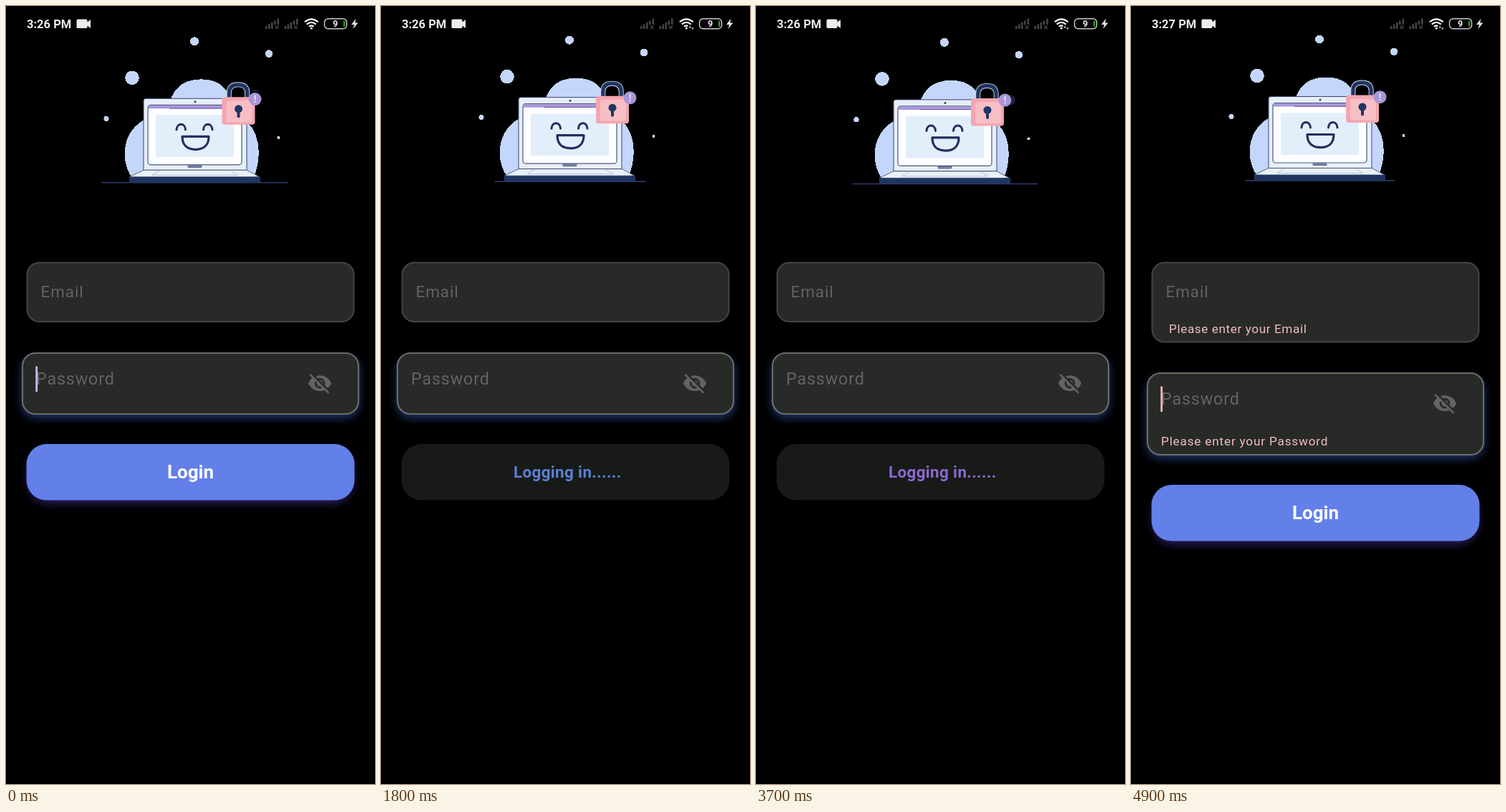
These frames come from a looping animation (515 px wide and 1087 px high, 5000 ms). An HTML page:

```html
<!DOCTYPE html>
<html lang="en">
<head>
<meta charset="utf-8">
<title>Login</title>
<style>
  html, body { margin: 0; width: 100%; height: 100%; overflow: hidden; background: #000; }
  svg { display: block; width: 100%; height: 100%; }
  text { font-family: Roboto, sans-serif; }
  .hint { fill: #626461; }
  .error { fill: #efbdc2; font-size: 17.2px; }
  .box { fill: #282a27; }
  .navy { stroke: #22305e; fill: none; stroke-linecap: round; }
</style>
</head>
<body>
<svg viewBox="0 0 515 1087">
  <defs>
    <filter id="blur" x="-20%" y="-50%" width="140%" height="200%"><feGaussianBlur stdDeviation="6.500"/></filter>
    <g id="signal" fill="#454545">
      <path d="M0 28h2.600v4H0zM4 25.500h2.600V32H4zM8 23h2.600v9H8zM12 20.500h2.600v5.500H12zM16.500 17.500h2.600v8.500h-2.600z"/>
      <path d="M13.500 27.500l5 4.500m0-4.500l-5 4.500" stroke="#454545" stroke-width="1.300"/>
    </g>
  </defs>
  <rect width="515" height="1087"/>

  <g id="status" fill="#ececec">
    <text id="clock" x="29" y="31" font-size="16.500" font-weight="700"></text>
    <path d="M100.500 18.500h11q2 0 2 2v2l4.500-3.500v12l-4.500-3.500v2q0 1.500-2 1.500h-11q-2 0-2-1.500v-9q0-2 2-2z"/>
    <use href="#signal" x="362"/>
    <use href="#signal" x="388.500"/>
    <path d="M416.800 22.300q9.400-8 18.800 0M419.800 25.600q6.400-5.600 12.800 0M422.800 28.800q3.400-3 6.800 0" fill="none" stroke="#fff" stroke-width="2.100"/>
    <circle cx="426.200" cy="31" r="1.600" fill="#fff"/>
    <g id="traffic">
      <path d="M428.500 27h9v7h-9z" fill="#000"/>
      <path d="M429.500 30.500l1.700-2.500 1.700 2.500zM433.200 30.500l1.700 2.500 1.700-2.500z"/>
    </g>
    <rect x="444.500" y="17.700" width="31" height="14" rx="5" fill="none" stroke="#c9c9c9" stroke-width="1.500"/>
    <path d="M471 20.500h.5q1.700 0 1.700 2v4.500q0 2-1.700 2h-.5z" fill="#3c9a2a"/>
    <text x="459.500" y="29.300" font-size="12.500" font-weight="700" text-anchor="middle">9</text>
    <path d="M488.500 17.500l-6.500 8.500h4l-1.500 6 6.800-8.500h-4.200z"/>
  </g>

  <g id="art">
    <g fill="#c4d6fb" shape-rendering="crispEdges">
      <circle cx="263" cy="49" r="6"/>
      <circle cx="367" cy="66.300" r="5.300"/>
      <circle cx="176" cy="100" r="9.800"/>
      <circle cx="140" cy="157" r="3.600"/>
      <circle cx="380.500" cy="183.500" r="2.100"/>
      <path d="M177 241C161 222 158 177 194 158L227 140C233 112 250 102 272 102 296 102 311 113 316 140L336 161C356 180 357 213 345 241z"/>
    </g>
    <path id="ground" stroke="#303c76" stroke-width="1.500"/>
    <path d="M192 229V132q0-3 3-3h138q3 0 3 3v97z" fill="#e8eef8" stroke="#35446f"/>
    <rect x="198" y="138" width="131" height="83.500" rx="4" fill="#fdfeff" stroke="#4a5880" stroke-width="1.200"/>
    <path d="M199 143v-2q0-2.500 2.500-2.500H302v4.500z" fill="#a997db"/>
    <path d="M228 142.800h74" stroke="#6d4fa8"/>
    <rect x="209" y="152" width="109" height="58.500" fill="#e3eefb"/>
    <circle cx="264" cy="133.500" r="1.500" fill="#35446f"/>
    <rect x="254" y="222.500" width="19" height="2.600" rx="1" fill="#8592b4" stroke="#35446f" stroke-width=".8"/>
    <path d="M192 229h144l18 9.500H172z" fill="#e9f0f8" stroke="#35446f" stroke-width=".8"/>
    <path d="M214 230l-10 6h120l-10-6" fill="none" stroke="#b9c5d8"/>
    <path d="M172 238.500h183v7.800H172z" fill="#203561"/>
    <path id="eyes" class="navy" stroke-width="3"/>
    <path class="navy" stroke-width="3.200" stroke-linejoin="round" d="M246 182H283C283 194 276 200.200 264.500 200.200S246 194 246 182z"/>
    <g id="lock">
      <path d="M309.800 130v-9q0-11.500 12.700-11.500t12.700 11.500v9" fill="none" stroke="#d5deef" stroke-width="7"/>
      <path d="M309.800 130v-9q0-11.500 12.700-11.500t12.700 11.500v9" fill="none" stroke="#203561" stroke-width="5.200"/>
      <rect x="300" y="127" width="46" height="38.500" rx="4" fill="#f3a6b0"/>
      <rect x="306" y="132" width="36" height="30" rx="3" fill="#f8bec5"/>
      <circle cx="323" cy="143.500" r="5.500" fill="#203561"/>
      <path d="M323 144v10" stroke="#203561" stroke-width="4" stroke-linecap="round"/>
    </g>
    <path id="ring" fill="none" stroke="#353a5f" stroke-width="1.300"/>
    <g id="badge">
      <circle r="9" fill="#a996d9"/>
      <path id="mark" d="M-.900-5.500h2l-.3 7h-1.400zM-.900 3h2v2h-2z" fill="#eee8fb"/>
    </g>
  </g>

  <rect id="email" class="box" x="29.500" y="358.500" width="456" rx="17" stroke="#434442" stroke-width="2"/>
  <text class="hint" x="48.500" y="407" font-size="22.500" letter-spacing=".9">Email</text>
  <text class="error" x="53" y="457" letter-spacing=".58">Please enter your Email</text>

  <g id="password">
    <rect id="glow" x="22.500" y="490" width="470" rx="19" fill="#213b76" filter="url(#blur)"/>
    <rect id="field" class="box" x="23" y="485" width="469" rx="18" stroke="#6a6b69" stroke-width="2.200"/>
    <text class="hint" x="42" y="528.500" font-size="23.300" letter-spacing=".85">Password</text>
    <path id="cursor" d="M41.300 503.500h2.800v35.500h-2.800z"/>
    <path fill="#626461" transform="translate(420.500 509.600) scale(1.460)" d="M12 7c2.760 0 5 2.240 5 5 0 .65-.13 1.260-.36 1.830l2.920 2.920c1.510-1.260 2.700-2.890 3.430-4.750-1.730-4.390-6-7.500-11-7.500-1.400 0-2.740.25-3.980.7l2.160 2.160C10.740 7.130 11.350 7 12 7zM2 4.270l2.740 2.740C3.080 8.300 1.780 10.020 1 12c1.730 4.390 6 7.500 11 7.500 1.550 0 3.030-.3 4.380-.84L19.730 22 21 20.730 3.270 3zM7.530 9.800l1.550 1.550c-.05.21-.08.43-.08.65 0 1.660 1.340 3 3 3 .22 0 .44-.03.65-.08l1.550 1.550c-.67.33-1.410.53-2.200.53-2.760 0-5-2.240-5-5 0-.79.2-1.530.53-2.200zm4.310-.78l3.150 3.150.02-.16c0-1.660-1.340-3-3-3z"/>
    <text class="error" x="42" y="586" letter-spacing=".8">Please enter your Password</text>
  </g>

  <g id="button">
    <rect id="shade" x="31" y="620" width="453" height="74" rx="28" fill="#34206e" filter="url(#blur)"/>
    <rect id="face" x="28.600" y="612" width="457.800" height="78.600" rx="28"/>
    <text id="login" x="257.500" y="660" font-size="26" font-weight="700" fill="#fff" text-anchor="middle">Login</text>
    <text id="busy" x="185" y="659" font-size="22.400" font-weight="700" letter-spacing=".36">Logging in......</text>
  </g>
</svg>
<script>
const LOOP = 5000, BUSY = 1700, FAIL = 4700, MINUTE = 3800;
const el = {};
document.querySelectorAll('svg [id]').forEach(e => el[e.id] = e);
const errors = document.querySelectorAll('.error');
const set = (id, name, value) => el[id].setAttribute(name, value);
const show = (id, on) => set(id, 'visibility', on ? 'visible' : 'hidden');
const clamp = x => Math.max(0, Math.min(1, x));

// Piecewise linear track of [time, value] pairs
function track(keys, t) {
  const i = keys.findIndex(k => k[0] > t);
  if (i < 0) return keys[keys.length - 1][1];
  if (i === 0) return keys[0][1];
  const [t0, a] = keys[i - 1], [t1, b] = keys[i];
  return a + (b - a) * (t - t0) / (t1 - t0);
}

const groundWidth = [[0, 130], [500, 131], [1100, 120], [1700, 104], [2200, 109], [2900, 121],
  [3200, 128], [3450, 132], [3700, 129], [4600, 111], [4900, 104]];
const lockShift = [[0, 1.5], [500, 0], [1900, 0], [2200, 1.5], [2600, 0]];
const badgeSize = [[1900, 1], [2100, .3], [2200, .63], [2400, 1]];
const eyeLift = [[2000, 1], [2200, 0], [2400, 1]];
const tint = [[1700, 0], [2200, .05], [2900, 1], [3700, .75], [4600, .48]];
const rings = [
  [0, 300, 'M344 118.200h9'],
  [900, 1300, 'M359 128q0 8-8 10.500'],
  [3500, 3900, 'M355.500 122q5 7 0 15M359 124.500q3 5 0 10'],
  [4500, 4700, 'M334.500 128l3.500 7']
];

function drawArt(t) {
  const dy = 2.8 * Math.sin(2 * Math.PI * (t - 2130) / 4100);
  set('art', 'transform', `translate(0 ${dy})`);
  const w = track(groundWidth, t);
  set('ground', 'd', `M${264 - w} 246.500h${2 * w}`);

  const lift = track(eyeLift, t);
  const eye = x => lift < .3
    ? `M${x} 170.300l12 1.400`
    : `M${x} ${170 + 2.5 * lift}c.5-${10 * lift} 12-${10 * lift} 12.500 0`;
  set('eyes', 'd', eye(238) + eye(275.5));

  set('lock', 'transform', `translate(${track(lockShift, t)} 0)`);
  const size = track(badgeSize, t);
  set('badge', 'transform', `translate(347.500 129.700) scale(${size})`);
  show('mark', size > .8);
  const ring = rings.find(r => t >= r[0] && t < r[1]);
  set('ring', 'd', ring ? ring[2] : '');
}

function drawForm(t) {
  const failed = t >= FAIL, busy = t >= BUSY && !failed;
  const open = clamp((t - FAIL) / 170), grow = 28.5 * open;
  set('email', 'height', 82.5 + grow);
  set('password', 'transform', `translate(0 ${28 * open})`);
  set('field', 'height', 85 + grow + .5 * open);
  set('glow', 'height', 85 + grow);
  set('button', 'transform', `translate(0 ${57 * open})`);
  errors.forEach(e => e.setAttribute('opacity', open));

  show('cursor', (t + 150) % 1000 < 500);
  set('cursor', 'fill', failed ? '#f2b8b5' : '#cbb9f8');
  show('shade', !busy);
  show('login', !busy);
  show('busy', busy);
  set('face', 'fill', busy ? '#181a18' : '#637fe8');
  const k = track(tint, t), mix = (a, b) => Math.round(a + (b - a) * k);
  set('busy', 'fill', `rgb(${mix(88, 157)},${mix(128, 98)},${mix(212, 205)})`);
}

function render(t) {
  drawArt(t);
  drawForm(t);
  el.clock.textContent = t < MINUTE ? '3:26 PM' : '3:27 PM';
  show('traffic', t >= BUSY);
}

// Ten pictures a second, with a rest on the first one
function tick(now) {
  const t = Math.floor((now % LOOP) / 100) * 100;
  render(t < 300 ? 0 : t);
  requestAnimationFrame(tick);
}
render(0);
requestAnimationFrame(tick);
</script>
</body>
</html>
```
